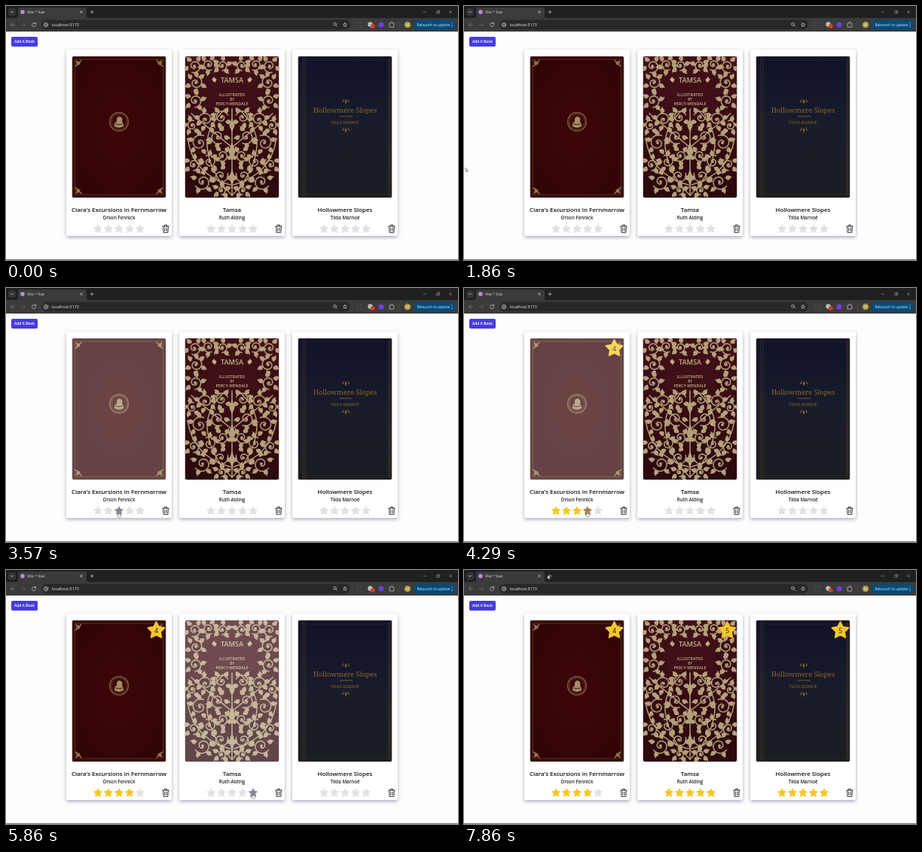
These frames come from a looping animation (600x338 px, 8 s). An HTML page:

```html
<!DOCTYPE html>
<html lang="en">
<head>
<meta charset="utf-8">
<title>Book shelf</title>
<style>
  html, body { margin: 0; width: 100%; height: 100%; overflow: hidden; background: #fdfdfd; }
  svg { display: block; width: 100vw; height: 100vh; font-family: "Open Sans", "Noto Sans", sans-serif; }
  .line { fill: none; stroke-linecap: round; stroke-linejoin: round; }
  .mid { text-anchor: middle; }
  .serif { font-family: "Noto Serif", "Liberation Serif", serif; }
  .card { fill: #fff; filter: drop-shadow(0 2px 2.5px rgba(50, 60, 95, .42)); }
  .title { font-size: 7.9px; font-weight: 600; fill: #111; }
  .author { font-size: 6.2px; font-weight: 600; fill: #222; }
</style>
</head>
<body>
<svg id="stage" viewBox="0 0 600 338" preserveAspectRatio="none">
  <defs>
    <radialGradient id="red"><stop offset="0" stop-color="#3e0609"/><stop offset="1" stop-color="#330407"/></radialGradient>
    <linearGradient id="wine" x2="0" y2="1"><stop offset="0" stop-color="#421018"/><stop offset="1" stop-color="#2c080d"/></linearGradient>
    <linearGradient id="navy" x2="0" y2="1"><stop offset="0" stop-color="#10122b"/><stop offset=".5" stop-color="#191c2a"/><stop offset="1" stop-color="#1a1d21"/></linearGradient>
    <clipPath id="edge"><rect x="-62.5" y="67" width="125" height="188" rx="2"/></clipPath>
    <path id="star" d="" stroke-linejoin="round"/>
    <path id="leaf" d="M0 0Q1-6 9-4Q6-3 7-1Q6 4 0 0Z"/>
    <g id="trash" class="line" stroke="#222" stroke-width=".9">
      <path d="M-4.2-3.2H4.2M-1.6-3.4V-5H1.6V-3.4M-3.4-3L-2.9 5H2.9L3.4-3M-1.2-1V3M1.2-1V3"/>
    </g>
  </defs>

  <rect width="600" height="17" fill="#1f2020"/>
  <rect y="16" width="600" height="18" fill="#3b3b3b"/>
  <rect x="3" y="3" width="10" height="10" rx="3" fill="#343535"/>
  <path d="M13 16Q16 16 16 13V5Q16 2 19 2H104Q107 2 107 5V13Q107 16 110 16Z" fill="#3b3b3b"/>
  <circle cx="22" cy="8" r="2.8" fill="#b98be0"/>
  <text x="28" y="10" font-size="5" fill="#ddd">Vite + Vue</text>
  <g class="line" stroke="#ccc" stroke-width=".7">
    <path d="M6.3 7.3L8 9L9.7 7.3M98.5 6.5L101.5 9.5M101.5 6.5L98.5 9.5M112 8H116M114 6V10"/>
    <path d="M554 8H557.5M588.4 6.4L591.6 9.6M591.6 6.4L588.4 9.6M571.8 7.2H574.6V10H571.8ZM573 7V6H575.8V9H575" stroke="#999" stroke-width=".6"/>
    <path d="M11.5 25H6.5L9 22.5M6.5 25L9 27.5" stroke="#888"/>
    <path d="M20.5 25H25.5L23 22.5M25.5 25L23 27.5" stroke="#666"/>
    <path d="M39.2 23.4A2.6 2.6 0 1 0 39.7 25.6M39.6 22V23.8H37.8"/>
  </g>
  <rect x="47" y="18.5" width="410" height="13" rx="6.5" fill="#282828"/>
  <circle cx="53" cy="25" r="4.5" fill="#3b3b3b"/>
  <g class="line" stroke="#ccc" stroke-width=".7">
    <circle cx="53" cy="25" r="2.4"/><path d="M53 25V26.2M53 23.8V23.9"/>
    <circle cx="436.5" cy="24.2" r="1.9"/><path d="M438 25.7L439.7 27.4"/>
    <use href="#star" transform="translate(450 25.1) scale(.46)" stroke-width="1.5"/>
    <path d="M509.5 23H511V22.2A1 1 0 0 1 513 22.2V23H514.7V24.8A1 1 0 0 1 514.7 26.6V28H509.5Z"/>
    <path d="M466 22.5H468M470 22.5H472M466 28H468M470 28H472M466 22.5V24M472 22.5V24M466 26.5V28M472 26.5V28" stroke="#555"/>
  </g>
  <text x="61" y="26.8" font-size="5.3" fill="#eee">localhost:5173</text>
  <circle cx="483.5" cy="24.5" r="3.2" fill="#b9c0b1"/>
  <rect x="484" y="24.5" width="5.5" height="5" rx="1" fill="#d83b31"/>
  <circle cx="498" cy="25" r="3.5" fill="#713cdf"/>
  <path d="M522.5 21V29" stroke="#555" stroke-width=".6"/>
  <circle cx="533" cy="25" r="4.3" fill="#a99a3f"/>
  <text class="mid" x="533" y="26.7" font-size="4.7" fill="#fff">M</text>
  <rect x="541" y="18.5" width="56" height="13" rx="6.5" fill="#064b78"/>
  <text x="545.5" y="26.7" font-size="4.8" fill="#d3ebfb">Relaunch to update</text>
  <path d="M592 22.7V22.8M592 25V25.1M592 27.3V27.4" class="line" stroke="#d3ebfb" stroke-width="1.1"/>

  <rect x="7" y="41" width="35" height="13" rx="2" fill="#453cdc"/>
  <text class="mid" x="24.5" y="49.4" font-size="4.9" font-weight="600" fill="#fff">Add A Book</text>
  <rect y="337" width="600" height="1" fill="#777"/>
  <g id="cards"></g>
  <g id="cursor" fill="#fff" stroke="#444" stroke-width=".5" stroke-linejoin="round">
    <path id="arrow" d="M0 0V5L1.2 4L2 5.8L2.8 5.4L2 3.7H3.6Z"/>
    <path id="hand" d="M-.6 0Q0-.7.6 0V2.2L2.8 2.9V4.8L2 6.2H-1.1L-2.6 3.8L-2 3.3L-.6 4.2Z"/>
    <path id="beam" d="M-1.3-3H1.3M0-3V3M-1.3 3H1.3" fill="none" stroke="#222" stroke-width=".7"/>
  </g>
</svg>
<script>
const $ = id => document.getElementById(id);
const rad = deg => deg * Math.PI / 180;
const range = n => [...Array(n).keys()];

const starPoints = range(10).map(i => {
  const r = i % 2 ? 2.9 : 5.7, a = rad(i * 36 - 90);
  return `${(r * Math.cos(a)).toFixed(2)} ${(r * Math.sin(a)).toFixed(2)}`;
});
$("star").setAttribute("d", `M${starPoints.join("L")}Z`);

const mirror = s => s + `<g transform="scale(-1 1)">${s}</g>`;
const frame = (inset, color, width) =>
  `<rect x="${inset - 62.5}" y="${67 + inset}" width="${125 - 2 * inset}" height="${188 - 2 * inset}" fill="none" stroke="${color}" stroke-width="${width}"/>`;
const base = fill => `<rect x="-62.5" y="67" width="125" height="188" rx="2" fill="${fill}"/>`;
const words = (text, y, size, extra = "") =>
  `<text class="mid" y="${y}" font-size="${size}" ${extra}>${text}</text>`;

function redCover() {
  const corner = `<g class="line" stroke="#a98a58" stroke-width="1">
    <path d="M50 72L58 80M50 72Q52 78 57 72.5Q52 79 58 80"/><circle cx="54" cy="76" r="2" fill="#84683f"/></g>`;
  return base("url(#red)") + frame(1, "#4d3319", .7) + frame(4, "#6d5029", .6) +
    mirror(corner + `<g transform="translate(0 322) scale(1 -1)">${corner}</g>`) +
    `<g fill="none" stroke="#7d6040"><circle cy="154" r="12.3" stroke-width="1.5"/><circle cy="154" r="10.2" stroke-width=".6"/></g>
     <path d="M-6 160Q-7 155-3 154Q-4 147 1 147Q6 149 4 154Q7 157 6 160Q0 164-6 160Z" fill="#a58b67"/>
     <path d="M-5 157Q0 159 5 157" class="line" stroke="#4b1714"/>`;
}

function spiral(x, y, r, start, dir) {
  const points = range(22).map(i => {
    const a = rad(start + dir * i * 21), d = r * (1 - i / 27);
    return `${(x + d * Math.cos(a)).toFixed(1)} ${(y + d * Math.sin(a)).toFixed(1)}`;
  });
  const leaves = range(5).map(i => {
    const a = start + dir * (20 + i * 68);
    return `<use href="#leaf" transform="translate(${x} ${y}) rotate(${a}) translate(${r * .85} 0) rotate(${dir * 60}) scale(1 ${dir})"/>`;
  }).join("");
  return `<path class="line" d="M${points.join("L")}"/><g stroke="none">${leaves}<circle cx="${x}" cy="${y}" r="1.9"/></g>`;
}

function wineCover() {
  const curls = [
    [13, 79, 7, 90, 1], [31, 78, 8, 120, -1], [50, 80, 9, 70, 1], [48, 102, 9, 260, -1],
    [49, 126, 9, 90, 1], [14, 148, 9, 200, 1], [35, 151, 10, 20, -1], [53, 159, 7, 250, 1],
    [19, 174, 10, 120, -1], [43, 182, 11, 240, 1], [13, 199, 8, 60, 1], [30, 207, 9, 300, -1],
    [51, 211, 8, 90, 1], [15, 226, 10, 200, -1], [39, 234, 11, 30, 1], [14, 245, 6, 90, 1]
  ];
  const half = curls.map(c => spiral(...c)).join("") +
    `<path class="line" d="M0 252Q27 225 32 194Q38 165 10 138M0 188Q22 170 54 143M2 238Q52 224 59 176"/>`;
  return base("url(#wine)") +
    `<g fill="#b3a07a" stroke="#b3a07a" stroke-width="1.5">${mirror(half)}
       <path d="M0 137V252" class="line"/>
       <path d="M0 151L3 159L0 166L-3 159ZM0 183L4 194L0 202L-4 194ZM0 219L3 228L0 238L-3 228Z"/></g>
     <path d="M-30 90H30V108Q29 118 34 135H-34Q-29 118-30 108Z" fill="#3f1018"/>
     <g fill="#c3ae84" font-weight="600">${words("TAMSA", 102, 9.2)}${words("ILLUSTRATED", 120, 5.5)}${words("BY", 125.5, 4.5)}${words("PERCY-WENDALE", 131.5, 5.3)}
       ${mirror('<path d="M23 102Q18 97 23 96Q23 92 25 96Q29 97 23 102Z"/>')}</g>`;
}

function navyCover() {
  const ornament = y => `<g transform="translate(1 ${y})">
    <path d="M0-3L1.3 0L0 4L-1.3 0ZM-5-1L-2 0L-5 1ZM5-1L2 0L5 1Z"/><circle cx="-3" cy="-2" r=".8"/><circle cx="3" cy="-2" r=".8"/></g>`;
  return base("url(#navy)") + frame(1, "#2e291f", .7) +
    `<path d="M-56 68V254M-53 68V254M58 70V252M60 69V253" stroke="#594625" stroke-width=".6"/>
     <path d="M-52 72H58M-52 250H58" stroke="#383126" stroke-width=".5"/>
     <g class="serif" fill="#8a662f">${words("Hollowmere Slopes", 141.5, 9.2)}${words("TILDA MARNOË", 156.7, 4.9)}
       ${ornament(127)}${ornament(165)}<rect x="-7" y="146.5" width="17" height=".8"/></g>`;
}

const books = [
  { cx: 150, title: "Clara's Excursions in Fernmarrow", author: "Orson Fennick", cover: redCover(), score: 4, rated: 4250 },
  { cx: 300, title: "Tamsa", author: "Ruth Alding", cover: wineCover(), score: 5, rated: 6000 },
  { cx: 450, title: "Hollowmere Slopes", author: "Tilda Marnoë", cover: navyCover(), score: 5, rated: 6800 }
];

$("cards").innerHTML = books.map(b => `<g transform="translate(${b.cx} 0)">
  <rect class="card" x="-70" y="58" width="140" height="248" rx="2"/>
  <g class="cover"><g clip-path="url(#edge)">${b.cover}</g>
    <g class="badge"><use href="#star" transform="translate(49.5 80.5) scale(2)" fill="#f5c72b" stroke="#f5c72b" stroke-width="1"/>
      <text class="mid" x="49.5" y="84" font-size="9" fill="#222">${b.score}</text></g>
  </g>
  <text class="mid title" y="274">${b.title}</text>
  <text class="mid author" y="284.2">${b.author}</text>
  ${range(5).map(i => `<use class="rate" href="#star" x="${i * 14 - 28}" y="296.7" stroke-width="1"/>`).join("")}
  <use href="#trash" x="62" y="296.4"/>
</g>`).join("");

[...$("cards").children].forEach((card, i) => {
  books[i].coverNode = card.querySelector(".cover");
  books[i].badge = card.querySelector(".badge");
  books[i].stars = [...card.querySelectorAll(".rate")];
});

// Pointer stops: time, x, y
const stops = [
  [0, 600, 352], [290, 554, 341], [1000, 304, 284], [1860, 1, 215], [2000, -9, 212],
  [2430, -9, 225], [3150, 122, 298], [3570, 150, 299], [3900, 164, 298], [5100, 164, 298],
  [5750, 328, 298], [6100, 328, 298], [6600, 478, 298], [6950, 478, 298], [7800, 111, 7], [8000, 111, 7]
];

function pointer(t) {
  const i = Math.max(1, stops.findIndex(s => s[0] >= t));
  const [a, b] = [stops[i - 1], stops[i]];
  const p = (t - a[0]) / (b[0] - a[0]);
  return [a[1] + (b[1] - a[1]) * p, a[2] + (b[2] - a[2]) * p];
}

const overCard = (b, [x, y]) => Math.abs(x - b.cx) < 70 && y > 58 && y < 306;

function draw(t) {
  const [x, y] = pointer(t);
  let kind = "arrow";
  for (const b of books) {
    // Average recent hover states for a short fade
    const hover = range(6).filter(k => overCard(b, pointer(Math.max(0, t - k * 25)))).length / 6;
    const done = t >= b.rated;
    b.coverNode.setAttribute("opacity", 1 - .25 * hover);
    b.badge.setAttribute("visibility", done ? "visible" : "hidden");
    b.stars.forEach((star, i) => {
      const over = Math.hypot(x - (b.cx + i * 14 - 28), y - 296.7) < 6.5;
      const full = done && i < b.score;
      const color = full ? (over ? "#aa8148" : "#f6c723") : (over ? "#858997" : "#e1e2e5");
      star.setAttribute("fill", color);
      star.setAttribute("stroke", color);
      if (over) kind = "hand";
    });
    if (Math.abs(x - b.cx) < 62 && y > 265 && y < 287) kind = "beam";
  }
  $("cursor").setAttribute("transform", `translate(${x} ${y})`);
  for (const id of ["arrow", "hand", "beam"]) $(id).setAttribute("visibility", id === kind ? "visible" : "hidden");
}

const step = 1000 / 7;
const began = performance.now();
function tick(now) {
  const t = Math.max(0, now - began) % 8000;
  draw(Math.floor(t / step + .01) * step);
  requestAnimationFrame(tick);
}
draw(0);
requestAnimationFrame(tick);
</script>
</body>
</html>
```
